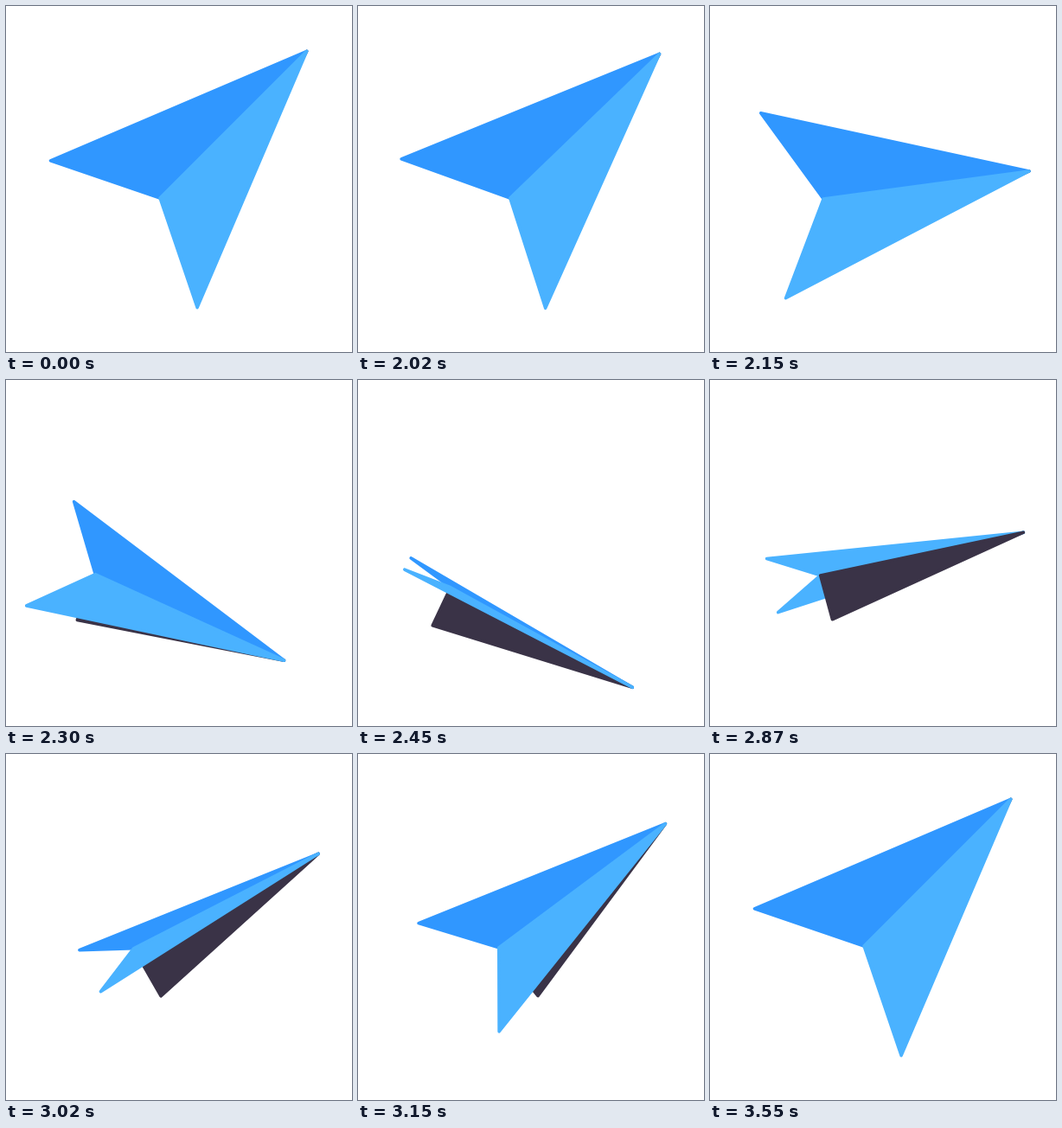
Write an HTML page with a canvas that moves like this. It is 400 px wide and 400 px high and loops after 3570 ms.

```html
<!DOCTYPE html>
<html lang="en">
<head>
<meta charset="utf-8">
<title>Paper plane</title>
<style>
  html, body { margin: 0; height: 100%; overflow: hidden; background: #fff; }
  canvas { display: block; width: 100vmin; height: 100vmin; }
</style>
</head>
<body>
<canvas width="400" height="400"></canvas>
<script>
const ctx = document.querySelector('canvas').getContext('2d');
const LOOP = 3570, START = 2000, END = 3550;
const LENGTH = 240, HALF_SPAN = 120, RAD = Math.PI / 180;
const BLUE = '#3097ff', LIGHT = '#4ab2ff', DARK = '#3a3347';

// Eases 0 to 1: a shapes the start, b the landing
function ease(t, from, to, a, b) {
  const s = Math.min(1, Math.max(0, (t - from) / (to - from)));
  return 1 - (1 - s ** a) ** b;
}

function poseAt(t) {
  const turn = ease(t, START + 10, 2420, 1.5, 3.13) - ease(t, 2470, END, 1.5, 3.13);
  const drift = ease(t, START, 2320, 1.7, 3) - ease(t, 2540, END, 2, 3.5);
  const roll = ease(t, START, 2700, 1.2, 1.38) - ease(t, 2700, END, 1.7, 2.17);
  const dive = Math.exp(-(((t - 2450) / 80) ** 2));

  const heading = -45 + 73.8 * turn;
  const span = HALF_SPAN * Math.cos(122 * RAD * roll);
  return {
    x: 178 - 75 * drift + 4 * dive,
    y: 222 + 4.5 * roll + 14.5 * dive,
    heading,
    span,
    depth: 54 + span / 8 - 0.22 * heading
  };
}

function panel(u, v, color) {
  ctx.beginPath();
  ctx.moveTo(0, 0);
  ctx.lineTo(LENGTH, 0);
  ctx.lineTo(u, v);
  ctx.closePath();
  ctx.fillStyle = ctx.strokeStyle = color;
  ctx.fill();
  ctx.stroke();
}

function draw(t) {
  const { x, y, heading, span, depth } = poseAt(t);
  const back = -56.5 - 2.5 * (span / HALF_SPAN) ** 2;
  const fromBelow = span < 0;
  const keel = () => panel(3, depth, DARK);

  ctx.clearRect(0, 0, 400, 400);
  ctx.save();
  ctx.translate(x, y);
  ctx.rotate(heading * RAD);
  ctx.lineWidth = 3.5;
  ctx.lineJoin = 'round';
  if (!fromBelow) keel();
  panel(back, -span, fromBelow ? LIGHT : BLUE);
  panel(back, span, LIGHT);
  if (fromBelow) keel();
  ctx.restore();
}

function tick() {
  draw(performance.now() % LOOP);
  requestAnimationFrame(tick);
}
tick();
</script>
</body>
</html>
```
